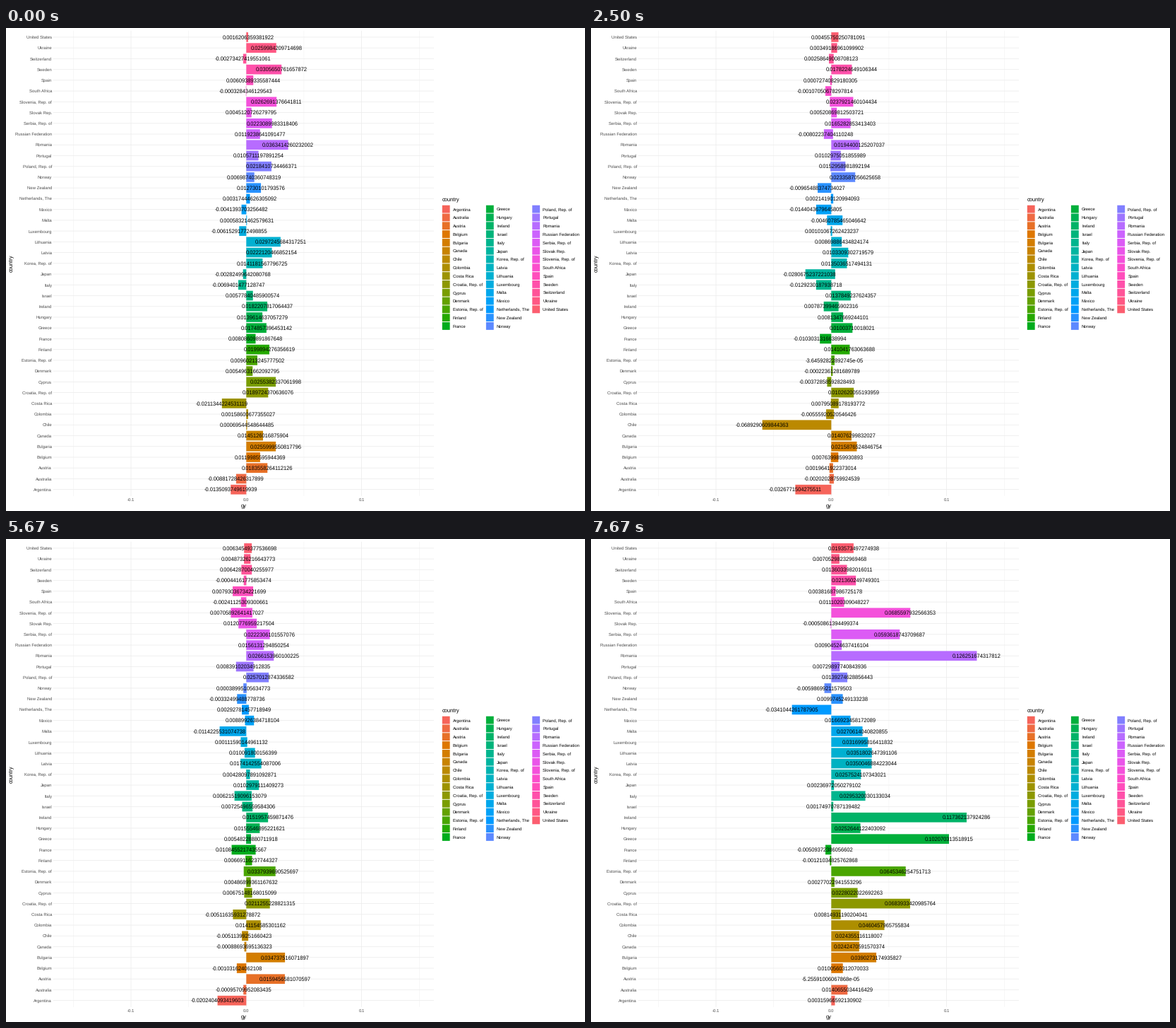
Animation of 820x683 px, one loop 8 s. Source, as a matplotlib script:

```python
import math

import matplotlib.pyplot as plt
from matplotlib.animation import FuncAnimation

W, H, DPI = 820, 683, 64                       # a power of two keeps sizes exact
PT = 72 / DPI                                  # points per pixel
LEFT, RIGHT, TOP, BOTTOM = 66.9, 606.0, 3.8, 661.8
ZERO, UNIT = 340.3, 1633                       # pixel of 0.0, pixels per 1.0
SMALL, BIG = 6.01, 7.53                        # font sizes in pixels
STEP = (BOTTOM - TOP) / 43.2
KEY = 11.81

# Rows from top to bottom
COUNTRIES = """United States|Ukraine|Switzerland|Sweden|Spain|South Africa
Slovenia, Rep. of|Slovak Rep.|Serbia, Rep. of|Russian Federation|Romania
Portugal|Poland, Rep. of|Norway|New Zealand|Netherlands, The|Mexico|Malta
Luxembourg|Lithuania|Latvia|Korea, Rep. of|Japan|Italy|Israel|Ireland|Hungary
Greece|France|Finland|Estonia, Rep. of|Denmark|Cyprus|Croatia, Rep. of
Costa Rica|Colombia|Chile|Canada|Bulgaria|Belgium|Austria|Australia
Argentina""".replace("\n", "|").split("|")
N = len(COUNTRIES)

# Growth labels of each period, in row order
PERIODS = [text.split() for text in (
    """0.0016206359381922 0.0259984209714698 -0.00273427419551061
    0.0305650761657872 0.00609389335587444 -0.0003284346129543
    0.0262691376641811 0.0045120726279795 0.0223089983318406
    0.0119238641091477 0.0363414260232002 0.0105711197891254
    0.0218410734466371 0.00698740360748319 0.012730101793576
    0.00317444626305092 -0.0041393703256482 0.00058321462579631
    -0.00615291772498855 0.0297245684317251 0.0222120466852154
    0.0141181567796725 -0.00282499642080768 -0.0069401477128747
    0.00577840485900574 0.0182207817064437 0.0139614637057279
    0.0174857396453142 0.00808609891867648 0.0199894276356619
    0.00960213245777502 0.00549631662092795 0.0255382337061998
    0.0189724370636076 -0.0211344224531119 0.00158600677355027
    0.00069544548644485 0.0145126016875904 0.0255999550817796
    0.0119985595944369 0.0183558264112126 -0.00881728426317899
    -0.0135093749619939""",
    """0.00455750250781091 0.00349186961099902 0.00258649008708123
    0.0178224649106344 0.00072740829180305 -0.00107050678297814
    0.0237921460104434 0.00520869812503721 0.0165282853413403
    -0.00802237404110248 0.0194400125207037 0.0102975051855989
    0.0152958981892194 0.0233587056625658 -0.00965488374734027
    0.00214190120994093 -0.0144043679645805 -0.00460785465046642
    0.00101067262423237 0.00869886434824174 0.0103309302719579
    0.0135036517494131 -0.0280675237221038 -0.0129230187938718
    0.0137849237624357 0.00787399465902316 0.0081347669244101
    0.01003710018021 -0.0103031316638994 0.0141041763063688
    -3.64592822892745e-05 -0.00022361281689789 -0.00372858592828493
    0.0102620055193959 0.00795089178193772 -0.00555920520546426
    -0.0689290609844363 0.014076299832027 0.0215876524846754
    0.0076399859930893 0.0019641922373014 -0.00202028759924539
    -0.0326771504275511""",
    """0.0129919250832666 0.0115387674006104 -0.0102600433076045
    0.0178766564839453 -0.00490465362635768 -0.0213831221083259
    -0.0063642068503557 0.00324513815536943 0.0173050498806591
    0.00784417032108371 0.0444826094513677 -0.00265399088662587
    -0.00390246863459791 0.0103818751318791 -0.0205597520644575
    -0.00170272495381446 -0.00792402300534098 0.0487628209279323
    -0.00250982541090363 0.0104998289158093 0.0321921132420853
    0.0139242194993452 0.0167055081757575 -0.0140859697242641
    0.0292399158212273 -0.0326510902813226 0.0187744459185744
    0.051732176398392 -0.00822347498160083 0.0235630500425623
    0.0140790223790686 0.00603766542562032 -0.00303962277029727
    0.0563380652624874 -0.00141331510393158 0.0110015470160975
    -0.023456093826423 0.0315806104652192 0.024424349087822
    -0.0018558447422105 -0.00799112085694083 0.0110071212014557
    -0.0252583635059534""",
    """0.00634549377536698 0.00487326216643773 0.00642870040255977
    -0.00044161775853474 0.00793036734221699 -0.00241125309300661
    0.00705892641417027 0.0120776959217504 0.0222306101557076
    0.0156131294850254 0.0266153960100225 0.00839102034912835
    0.0257012874336582 0.00038995105634773 -0.00332499488778736
    0.00292781457718949 0.00889926384718104 -0.0114225531074738
    0.00111590144961132 0.010091800156399 0.0174142554087006
    0.00428097891092871 0.0102979111409273 0.00621519096153079
    0.00725496559584306 0.0151957459871476 0.0155546895221621
    0.00548228880711918 0.0108455217435567 0.00669116237744327
    0.0337939690525697 0.00486899361167632 0.00675148168015099
    0.0211255228821315 -0.00511635931278872 0.0141154585301162
    -0.00511399251660423 -0.00088693695136323 0.034737516071897
    -0.001031624062108 0.0159456581070597 -0.00095709952083435
    -0.0202404093419603""",
    """-0.00760135969989101 -0.00789966297174089 -0.0170091627631947
    -0.0075391135439993 -0.047143905942611 -0.0112463893159058
    -0.0536298205797057 -0.0270970347870572 0.014871472129534
    0.0136171806671763 0.0155533927913423 -0.035562703381789
    0.00078678516473975 -0.0101764094961695 -0.0219998591835382
    -0.0154338034046593 -0.00441310550177098 -0.0580599372166399
    -0.0193337925069401 -0.00597774617732686 -0.0201669601437502
    -0.00028973526736921 0.0128708627849403 -0.0409023271562347
    -0.0142315389007286 0.0299649886180369 -0.00042350475844921
    -0.00046125335168313 -0.0509107758960798 -0.0029200397060424
    -0.00885157070723758 0.0008403567286303 -0.00721571025851898
    0.0184265429490189 -0.0309386097760527 0.00769943528682414
    0.00684825209345951 -0.00406602740684708 0.0301187053807572
    -0.029839848433358 0.0859775710827609 -0.00718429281497147
    -0.0390758298011269""",
    """0.0193573497274938 0.00705298232969468 0.0136033982016011
    0.021360249749301 0.00381687986725178 0.0111020309048227
    0.0685597932566353 -0.00050861394499374 0.0593618743709687
    0.00904524637416104 0.126251674317812 0.00729897740843936
    0.0139274628856443 -0.00598699211579503 0.0099745249133238
    -0.0341044261787905 0.0166923458172089 0.0270614040820855
    0.0316995816411832 0.0351802647391106 0.0350046884223044
    0.0257524107343021 0.00236972050279102 0.0295320030133034
    0.00174970787139482 0.117362137924286 0.0252644122403092
    0.102070313518915 -0.00509372386056602 -0.00121034825762868
    0.0645346254751713 0.00277022941553296 0.0228022022692263
    0.0683933420985764 0.00814931190204041 0.0460457965755834
    0.024355116118007 0.0242470591570374 0.0390273174935827
    0.0100560312070033 -5.25591006067868e-05 0.0140655034416429
    0.00315966592130902""")]

# (last still frame, first frame of the next period)
MOVES = [(4, 9), (14, 19), (24, 28), (33, 37), (42, 46)]
FRAMES = 48


def hcl(hue, chroma=100, lum=65, gamma=1.22):
    """Polar LUV colour to RGB, darkened by a display gamma."""
    h = math.radians(hue)
    y = ((lum + 16) / 116) ** 3
    u = chroma * math.cos(h) / (13 * lum) + 0.19784
    v = chroma * math.sin(h) / (13 * lum) + 0.46834
    x = 9 * y * u / (4 * v)
    z = -x / 3 - 5 * y + 3 * y / v
    linear = (3.2405 * x - 1.5372 * y - 0.4985 * z,
              -0.9693 * x + 1.8760 * y + 0.0416 * z,
              0.0556 * x - 0.2040 * y + 1.0572 * z)

    def encode(c):
        s = 12.92 * c if c <= 0.00304 else 1.055 * c ** (1 / 2.4) - 0.055
        return min(max(s, 0), 1) ** gamma

    return tuple(encode(c) for c in linear)


plt.rcParams["font.family"] = "Liberation Sans"
plt.rcParams["text.hinting"] = "none"
fig = plt.figure(figsize=(W / DPI, H / DPI), dpi=DPI, facecolor="white")
ax = fig.add_axes([0, 0, 1, 1])
ax.set_axis_off()


def write(x, y, text, size, ha="center", color="black", **kw):
    """Text whose capitals are centred on y."""
    return ax.text(x, y + 0.358 * size, text, fontsize=size * PT, ha=ha,
                   va="baseline", color=color, **kw)


def px(value):
    return ZERO + UNIT * value


rows = [TOP + STEP * (0.6 + i) for i in range(N)]
colors = [hcl(15 + 360 * (N - 1 - i) / N) for i in range(N)]

# Grid
grid = dict(color="#EBEBEB", snap=False, zorder=0)
ax.vlines([px(v) for v in (-0.15, -0.05, 0.05, 0.15)], TOP, BOTTOM,
          lw=0.37 * PT, **grid)
ax.vlines([px(v) for v in (-0.1, 0, 0.1)], TOP, BOTTOM, lw=0.73 * PT, **grid)
ax.hlines(rows, LEFT, RIGHT, lw=0.73 * PT, **grid)

# Axes
for y, name in zip(rows, COUNTRIES):
    write(65.1, y, name, SMALL, "right", "#4D4D4D")
for v in (-0.1, 0.0, 0.1):
    write(px(v), 666.8, f"{v:.1f}", SMALL, color="#4D4D4D")
write((LEFT + RIGHT) / 2, 675, "gy", BIG)
ax.text(9.2, (TOP + BOTTOM) / 2, "country", fontsize=BIG * PT, rotation=90,
        rotation_mode="anchor", ha="center", va="baseline")

# Legend
write(617.3, 241.9, "country", BIG, "left")
for k in range(N):
    i = N - 1 - k
    x = (617.3, 679.4, 744.8)[k // 15]
    y = 250.2 + KEY * (k % 15)
    ax.add_patch(plt.Rectangle((x + 0.48, y + 0.48), KEY - 0.96, KEY - 0.96,
                               color=colors[i], lw=0, snap=False))
    write(x + KEY + 3.76, y + KEY / 2, COUNTRIES[i], SMALL, "left")

bars = ax.barh(rows, 0, 0.9 * STEP, left=ZERO, color=colors, lw=0,
               snap=False, zorder=2)
labels = [write(ZERO, y, "", BIG, zorder=4) for y in rows]
ax.set_xlim(0, W)
ax.set_ylim(H, 0)


def phase(frame):
    """Period shown and the share of the way to the next one."""
    for k, (start, end) in enumerate(MOVES):
        if frame < end:
            return k, max(0, (frame - start) / (end - start))
    return len(MOVES), 0


def draw(frame):
    k, t = phase(frame)
    old, new = PERIODS[k], PERIODS[min(k + 1, len(MOVES))]
    for bar, label, a, b in zip(bars, labels, old, new):
        u, v = float(a), float(b)
        low = min(u, 0) * (1 - t) + min(v, 0) * t
        high = max(u, 0) * (1 - t) + max(v, 0) * t
        bar.set_x(px(low))
        bar.set_width(UNIT * (high - low))
        label.set_x(px(u * (1 - t) + v * t))
        label.set_text(a if t < 0.5 else b)
    return [*bars, *labels]


anim = FuncAnimation(fig, draw, frames=FRAMES, interval=8000 / FRAMES,
                     repeat=True, repeat_delay=0)
plt.show()
```
